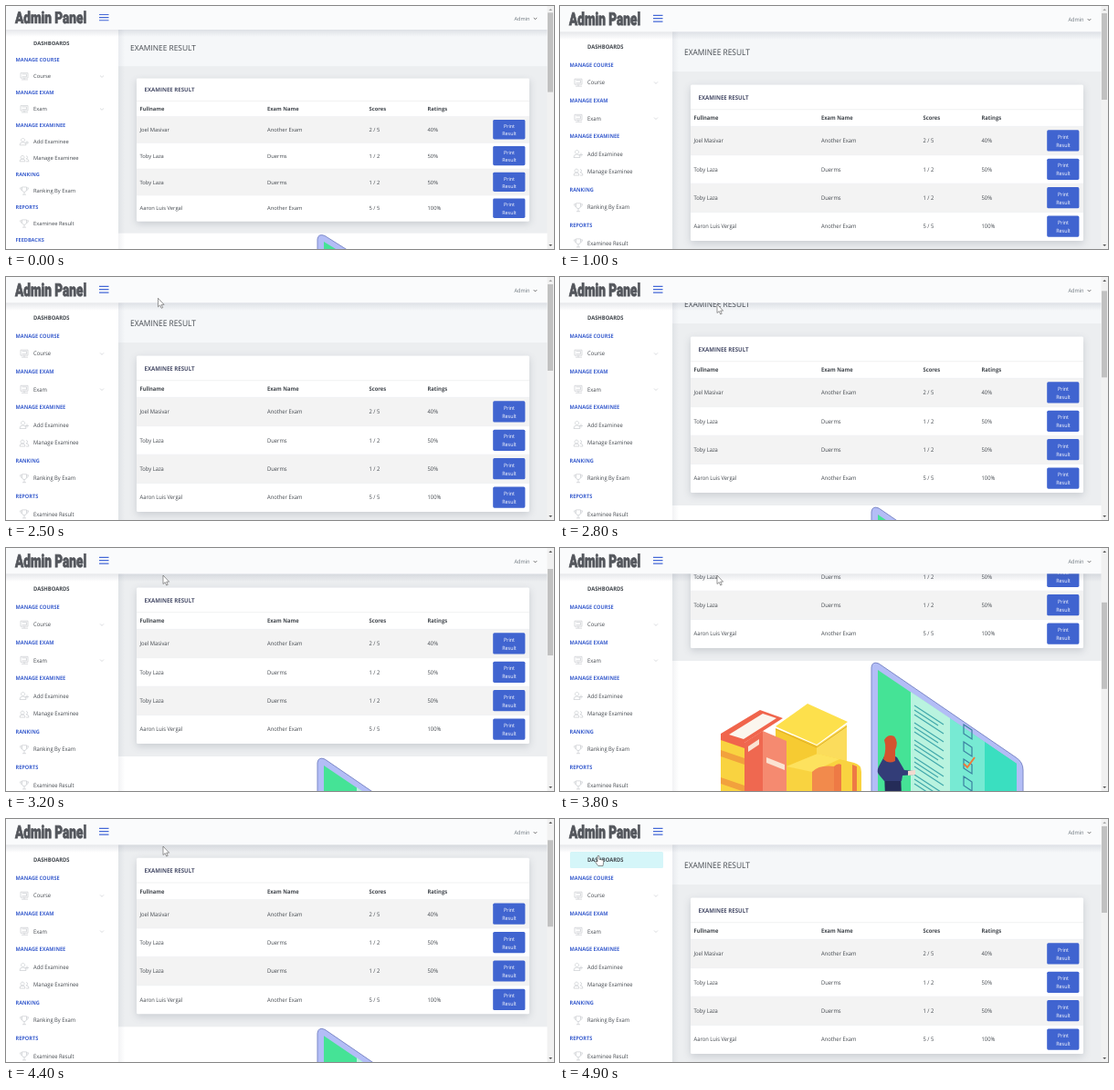
An HTML page that plays this animation: 600 px wide and 267 px high, repeating every 5000 ms.

```html
<!DOCTYPE html>
<html lang="en">
<head>
<meta charset="utf-8">
<title>Admin Panel</title>
<style>
html, body { margin: 0; width: 100%; height: 100%; overflow: hidden; background: #fff }
svg { display: block; width: 600px; height: 267px }
text { font: 5.8px "Open Sans", "Noto Sans", sans-serif; fill: #43484e; text-rendering: geometricPrecision;
  transform-box: fill-box; transform-origin: center; transform: scaleY(1.09) }
.b { font-weight: 700 }
.h { font-size: 5.6px; font-weight: 700; fill: #3f62cf }
.w { font-size: 5.4px; fill: #fff; text-anchor: middle }
.brand { font: 900 19.4px Roboto, sans-serif; fill: #53565c; stroke: #53565c; stroke-width: .8;
  transform-origin: left center; transform: scaleX(.7) }
.icon { fill: none; stroke: #c9ccd0; stroke-width: .7 }
</style>
</head>
<body>
<svg viewBox="0 0 600 267">
  <defs>
    <filter id="soft" x="-10%" y="-20%" width="120%" height="150%"><feGaussianBlur stdDeviation="4"/></filter>
    <linearGradient id="drop" x2="0" y2="1"><stop stop-color="#45506a" stop-opacity=".14"/><stop offset="1" stop-color="#45506a" stop-opacity="0"/></linearGradient>
    <linearGradient id="side"><stop stop-color="#45506a" stop-opacity=".07"/><stop offset="1" stop-color="#45506a" stop-opacity="0"/></linearGradient>
  </defs>
  <g id="page">
    <rect width="600" height="300" fill="#eceef0"/>
    <g id="content">
      <rect x="123" y="28" width="470" height="44" fill="#f5f7f9"/>
      <text x="136" y="53.6" style="font-size:8.4px">EXAMINEE RESULT</text>
      <rect x="143" y="89" width="430" height="172" fill="#5b6472" opacity=".24" filter="url(#soft)"/>
      <rect x="143" y="86.5" width="430" height="171.5" rx="1.5" fill="#fff"/>
      <text x="151.5" y="102.3" class="b" style="font-size:6.1px;fill:#4a4f6a">EXAMINEE RESULT</text>
      <path d="M143 113.7H573" stroke="#e6e7e9" stroke-width=".6"/>
      <g id="table"></g>
      <g id="art" transform="translate(0 148)">
        <rect x="123" y="124" width="470" height="330" fill="#fff"/>
        <!-- left stack -->
        <path d="M176 204L219 178 244 187 202 214V310H176Z" fill="#f0654c"/>
        <path d="M185 205L222 182 237 187 201 210Z" fill="#fbf6ee"/>
        <path d="M176 211L202 220V310H176Z" fill="#f9d340"/>
        <path d="M176 222L202 231V238L176 229ZM176 252L202 261V268L176 259Z" fill="#f2a13d"/>
        <!-- large yellow book -->
        <path d="M236 198L281 217V310H236Z" fill="#f6cb32"/>
        <path d="M281 217L314 194V310H281Z" fill="#fbdc5c"/>
        <path d="M236 196L271 171 315 191 281 216Z" fill="#fde04c"/>
        <path d="M236 199L281 219 314 196" fill="none" stroke="#dfae25"/>
        <!-- standing red book -->
        <path d="M202 214L222 201 248 212V310H202Z" fill="#f58a70"/>
        <path d="M202 214L222 201V310H202Z" fill="#ef6850"/>
        <path d="M206 218L218 210V216L206 224ZM226 230L246 238V244L226 236Z" fill="#fbe3d2"/>
        <!-- front spines -->
        <path d="M248 240L282 226 322 236Q330 238 330 246V310H248Z" fill="#f9d340"/>
        <path d="M248 240L282 226 306 232 276 246Z" fill="#fde25e"/>
        <path d="M276 246Q284 238 300 240V310H276Z" fill="#f28a4c"/>
        <path d="M300 240Q304 236 308 238V310H300ZM320 238L325 240V310H320Z" fill="#ee7a45"/>
        <!-- tablet -->
        <path d="M341 131Q342 124 349 127L499 230Q507 235 507 244V310H341Z" fill="#b3bdf6" stroke="#7d89c8"/>
        <path d="M348 134L500 237V310H348Z" fill="#45e396"/>
        <path d="M384 158L427 187V310H384Z" fill="#b9f3df"/>
        <path d="M427 187L465 213V310H427Z" fill="#77ead3"/>
        <path d="M465 213L500 237V310H465Z" fill="#3adfc0"/>
        <g id="checks" fill="none"></g>
        <path d="M442 237l4 4 8-11" fill="none" stroke="#ee7a3a" stroke-width="2"/>
        <!-- student -->
        <path d="M355 246H373L375 300H357Z" fill="#252c58"/>
        <path d="M355 229Q362 225 369 230L377 244 388 245V249L375 250 374 256H355L350 250Q346 246 349 240Z" fill="#333d78"/>
        <path d="M381 245L389 244V249L381 250Z" fill="#f3d9cf"/>
        <path d="M355 211Q359 204 366 207 371 213 367 222L367 234Q360 238 354 232 358 220 355 211Z" fill="#d4532f"/>
      </g>
    </g>
    <rect x="123" y="28" width="7" height="272" fill="url(#side)"/>
    <rect y="28" width="123" height="272" fill="#fff"/>
    <rect id="hover" x="11" y="36" width="102" height="18" rx="1.5" fill="#d5f6f9"/>
    <g id="menu"></g>
    <rect y="28" width="593" height="9" fill="url(#drop)"/>
    <rect width="593" height="28.3" fill="#fafbfc"/>
    <text x="10.3" y="20.6" class="brand">Admin Panel</text>
    <path d="M102 10.3h10.5M102 13.7h10.5M102 17.1h10.5" stroke="#4468d6" stroke-width="1.2"/>
    <text x="556.5" y="17.3" style="font-size:5.6px;fill:#6c757d">Admin</text>
    <path d="M577.8 14.2l1.7 1.7 1.7-1.7" fill="none" stroke="#555" stroke-width=".9"/>
  </g>
  <rect x="592.5" width="7.5" height="267" fill="#f1f1f1"/>
  <rect id="thumb" x="593" width="6" fill="#c1c1c1"/>
  <path id="up" d="M594.3 5L596.2 3 598.1 5Z"/>
  <path d="M594.3 262L596.2 264 598.1 262Z" fill="#505050"/>
  <path id="arrow" d="M0 0V9.5L2.2 7.6 3.7 11 5.2 10.3 3.7 7.1H6.6Z" fill="#fff" stroke="#555" stroke-width=".6"/>
  <path id="hand" d="M-1 6V.8Q0-.6 1 .8V4.2L5 5.2Q6 5.6 5.8 7L5 11.5H-.2L-3.2 7.5Q-3 6-1 7Z" fill="#fff" stroke="#444" stroke-width=".6"/>
</svg>
<script>
const $ = id => document.getElementById(id);
const text = (x, y, s, cls = "") => `<text x="${x}" y="${y + 2.1}" class="${cls}">${s}</text>`;

const columns = [146.5, 286, 397.5, 461.5];
const line = (cells, y, cls) => cells.map((s, i) => text(columns[i], y, s, cls)).join("");
const people = [
  ["Joel Masivar", "Another Exam", "2 / 5", "40%"],
  ["Toby Laza", "Duerms", "1 / 2", "50%"],
  ["Toby Laza", "Duerms", "1 / 2", "50%"],
  ["Aaron Luis Vergal", "Another Exam", "5 / 5", "100%"]
];
$("table").innerHTML = line(["Fullname", "Exam Name", "Scores", "Ratings"], 123, "b") +
  people.map((cells, i) => {
    const y = 132.3 + i * 31.4;
    return `<rect x="143" y="${y}" width="430" height="31.4" fill="${i % 2 ? "none" : "#f3f3f3"}"/>
      <path d="M143 ${y}h430" stroke="#e9ebee" stroke-width=".5"/>` + line(cells, y + 15.7) +
      `<rect x="533.2" y="${y + 4}" width="35.2" height="23.2" rx="1.6" fill="#4064d0"/>` +
      text(551, y + 11.3, "Print", "w") + text(551, y + 20.4, "Result", "w");
  }).join("");

const icons = {
  screen: "M-4-4H4V2H-4ZM-2.5-2.5H2.5V.5H-2.5M-3 4H4M0 2V4",
  user: "M-1.5-4a2 2 0 1 0 .1 0M-5 4Q-5 .5-1.5 .5T2 4ZM3-1V3M1 1H5",
  users: "M-2-3a2 2 0 1 0 .1 0M-5 4Q-5 1-2 1T1 4ZM2-2.5a1.6 1.6 0 1 1 0 3.2Q5 1 5 4H2",
  cup: "M-2.5-4.5H2.5V-1Q2 1.5 0 1.5T-2.5-1ZM-2.5-3.5H-4.5Q-4.5-1-2.4-.5M2.5-3.5H4.5Q4.5-1 2.4-.5M0 1.5V4.5M-2 4.5H2"
};
const menu = [
  ["DASHBOARDS"], ["MANAGE COURSE"], ["Course", "screen"], ["MANAGE EXAM"], ["Exam", "screen"],
  ["MANAGE EXAMINEE"], ["Add Examinee", "user"], ["Manage Examinee", "users"],
  ["RANKING"], ["Ranking By Exam", "cup"], ["REPORTS"], ["Examinee Result", "cup"], ["FEEDBACKS"]
];
$("menu").innerHTML = menu.map(([label, icon], i) => {
  const y = 45 + i * 19.58;
  if (!i) return text(30, y, label, "b");
  if (!icon) return text(10.5, y, label, "h");
  const chevron = icon == "screen" ? `<path class="icon" d="M103 ${y - .8}l2 2 2-2"/>` : "";
  return text(30, y, label) + `<path class="icon" d="${icons[icon]}" transform="translate(20 ${y})"/>` + chevron;
}).join("");

// Check boxes and answer lines lean with the tablet.
$("checks").innerHTML = [0, 1, 2, 3, 4].map(i => {
  const y = 194 + i * 19;
  return `<path d="M442 ${y}l9 6v10l-9-6Z" stroke="#3b7fa0" stroke-width="1.2"/>
    <path d="M388 ${y - 21}l32 21M388 ${y - 16}l26 17M388 ${y - 11}l32 21" stroke="#40a8ac" stroke-width="1.2"/>`;
}).join("");

const scrollKeys = [[2600, 0], [2800, 21], [3000, 40], [3200, 43], [3400, 62], [3800, 148], [4000, 165],
  [4200, 115], [4400, 43.7], [4600, 14], [4700, 0]];
const xKeys = [[2200, 150], [2600, 172], [4500, 172], [4800, 42]];
const yKeys = [[2200, 3], [2600, 30], [4500, 30], [4800, 40]];

function at(keys, t) {
  const i = keys.findIndex(k => k[0] > t);
  if (i < 0) return keys[keys.length - 1][1];
  if (!i) return keys[0][1];
  const [t0, a] = keys[i - 1], [t1, b] = keys[i];
  return a + (b - a) * (t - t0) / (t1 - t0);
}

const start = performance.now();
function draw(now) {
  const t = Math.floor(Math.max(0, now - start) % 5000 / 100) * 100;
  const squash = t < 800 ? .918 : 1;
  const scroll = at(scrollKeys, t);
  const x = at(xKeys, t), y = at(yKeys, t);
  const onMenu = t >= 4800;
  const set = (id, name, value) => $(id).setAttribute(name, value);
  set("page", "transform", `scale(1 ${squash})`);
  set("content", "transform", `translate(0 ${-scroll})`);
  set("thumb", "y", 8 * squash + scroll * .35);
  set("thumb", "height", 95 * squash);
  set("up", "fill", scroll ? "#505050" : "#a3a3a3");
  set("hover", "opacity", +onMenu);
  set("hand", "opacity", +onMenu);
  set("arrow", "opacity", +(t >= 2200 && !onMenu));
  for (const id of ["arrow", "hand"]) set(id, "transform", `translate(${x} ${y})`);
  requestAnimationFrame(draw);
}
draw(start);
</script>
</body>
</html>
```
